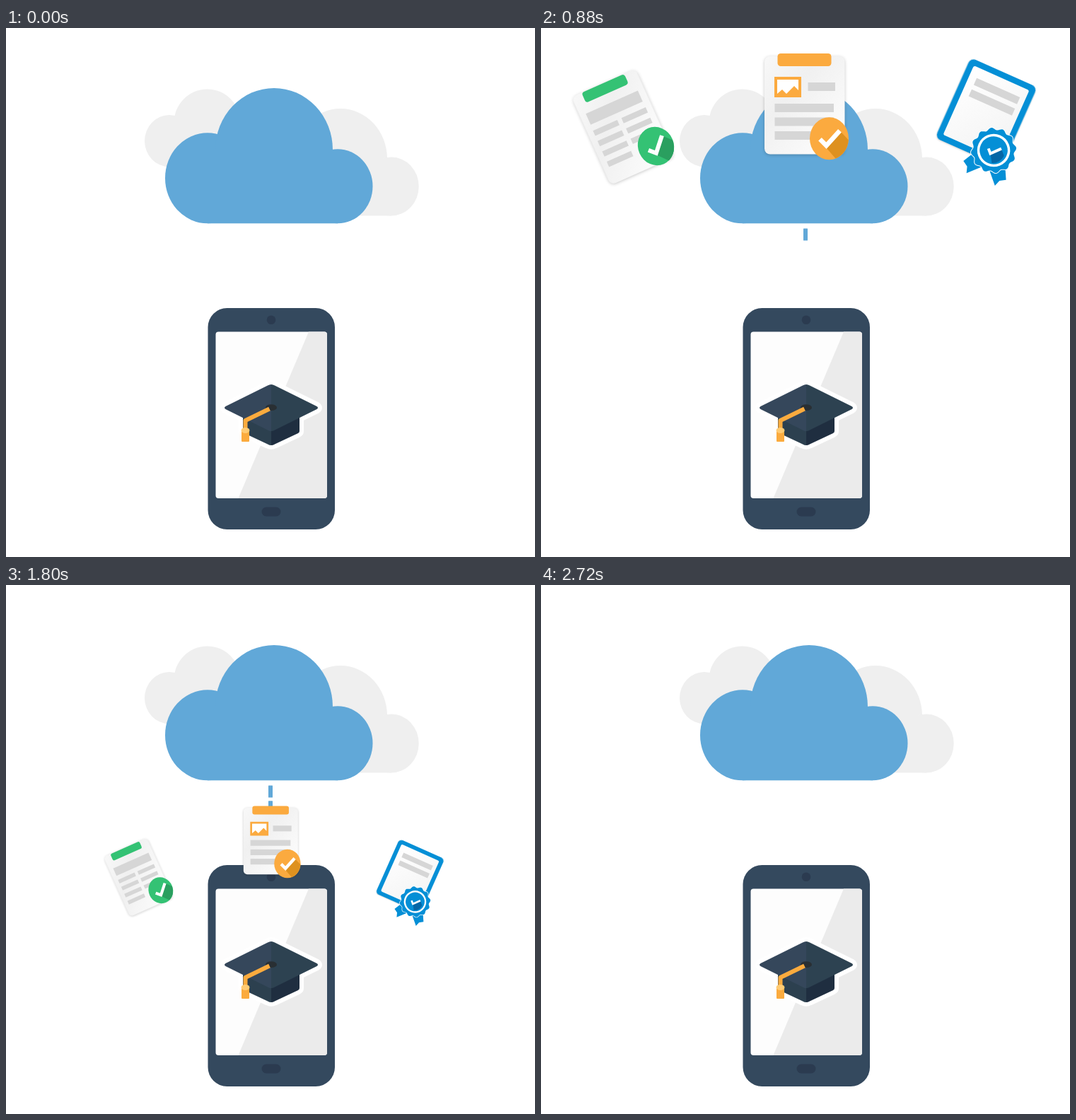
Write an HTML page that moves like this. It is 748 px wide and 748 px high and loops after 3600 ms.

```html
<!DOCTYPE html>
<html lang="en">
<head>
<meta charset="utf-8">
<title>Documents from cloud to phone</title>
<style>
  html, body { margin: 0; width: 100%; height: 100%; overflow: hidden; background: #fff; }
  svg { display: block; width: 100%; height: 100%; }
  .paper { fill: url(#sheet); filter: drop-shadow(0 1px 2px rgba(0, 0, 0, .22)); }
  .bar { fill: #d6d6d6; }
  .tick { fill: none; stroke: #fff; stroke-width: 6.5; }
</style>
</head>
<body>
<svg viewBox="0 0 748 748">
  <defs>
    <linearGradient id="sheet" x1="0" y1="0" x2="1" y2="1">
      <stop offset="0" stop-color="#f8f8f8"/>
      <stop offset=".35" stop-color="#f0f0f0"/>
      <stop offset="1" stop-color="#fff"/>
    </linearGradient>
    <linearGradient id="awardSheet" x1="0" y1="0" x2="1" y2="1">
      <stop offset="0" stop-color="#fff"/>
      <stop offset="1" stop-color="#f3f3f3"/>
    </linearGradient>
    <path id="tick" class="tick" d="M-13 1L-4 10L15 -11"/>
    <path id="ribbon" d="M4 26L22 45L25 36L33 31L24 14Z"/>
  </defs>

  <g id="phone">
    <rect x="285.5" y="396" width="179.5" height="313" rx="27" fill="#34495e"/>
    <circle cx="375" cy="412.7" r="6.3" fill="#2b3b50"/>
    <rect x="361.5" y="677.5" width="27" height="13" rx="6.5" fill="#2b3b50"/>
    <rect x="296.5" y="429.5" width="157.5" height="235.5" rx="4" fill="#fdfdfd"/>
    <path d="M428 429.5H450Q454 429.5 454 433.5V661Q454 665 450 665H328.5Z" fill="#ebebeb"/>
  </g>

  <g id="cap">
    <path fill="#fff" stroke="#fff" stroke-width="12" stroke-linejoin="round" d="M310.5 535L370 505.5Q375 502.5 380 505.5L439.5 535Q442.5 537 439.5 539L415 551V570Q415 572 413 573L380 588.5Q375 591 370 588.5L337 573Q335 572 335 570V551L310.5 539Q307.5 537 310.5 535Z"/>
    <path d="M335 545V570Q335 572 337 573L370 588.5Q372.5 590 375 590V545Z" fill="#2c404f"/>
    <path d="M415 545V570Q415 572 413 573L380 588.5Q377.5 590 375 590V545Z" fill="#1f2e40"/>
    <path d="M375 504Q372.5 504 370 505.5L310.5 535Q307.5 537 310.5 539L370 568.5Q372.5 570 375 570Z" fill="#35475b"/>
    <path d="M375 504Q377.5 504 380 505.5L439.5 535Q442.5 537 439.5 539L380 568.5Q377.5 570 375 570Z" fill="#2d4251"/>
    <ellipse cx="375" cy="536.7" rx="8" ry="4.4" fill="#292f33"/>
    <path d="M372.5 538.5L338.5 555V569" fill="none" stroke="#fbab3e" stroke-width="6" stroke-linejoin="round"/>
    <rect x="333" y="570" width="11" height="15" rx="1" fill="#fbab3e"/>
    <ellipse cx="338.5" cy="569" rx="6" ry="4" fill="#ffcb73"/>
  </g>

  <g id="sides">
    <g id="list">
      <g id="listBody" transform="rotate(-24)">
        <rect class="paper" x="-49.5" y="-68" width="99" height="136" rx="8"/>
        <rect x="-34" y="-68" width="66" height="15.5" rx="4" fill="#34c274"/>
        <rect class="bar" x="-40.5" y="-38.5" width="80.5" height="17"/>
      </g>
    </g>
    <g id="award">
      <g transform="translate(-.5 -13.5) rotate(24)">
        <rect x="-51.5" y="-62" width="103" height="124" rx="8" fill="#048fd6" style="filter:drop-shadow(0 1px 1px rgba(0,0,0,.18))"/>
        <rect x="-43" y="-53.5" width="86" height="107" rx="3" fill="url(#awardSheet)"/>
        <rect class="bar" x="-32" y="-39" width="67" height="10.5"/>
        <rect class="bar" x="-32" y="-21.5" width="67" height="10.5"/>
        <g transform="translate(31.4 44.6)">
          <g fill="#048fd6">
            <use href="#ribbon"/>
            <use href="#ribbon" transform="scale(-1 1)"/>
            <path id="rosette" stroke="#fff" stroke-width="2" paint-order="stroke"/>
          </g>
          <circle r="21.5" fill="none" stroke="#fff" stroke-width="3.5"/>
          <path d="M9 -6.6L16.5 1A18 18 0 0 1 5 17.5L-2.4 6Z" fill="#0667a6"/>
          <use href="#tick" transform="scale(.6)"/>
        </g>
      </g>
    </g>
  </g>

  <g fill="#efefef">
    <ellipse cx="231" cy="159.7" rx="35" ry="36.7"/>
    <ellipse cx="284.5" cy="134" rx="47" ry="47.5"/>
    <rect x="231" y="134" width="80" height="62.4"/>
    <ellipse cx="473" cy="185" rx="66" ry="71"/>
    <ellipse cx="545" cy="224" rx="38.7" ry="41.5"/>
    <rect x="473" y="185" width="72" height="80.5"/>
  </g>
  <g fill="#61a8d8">
    <ellipse cx="285" cy="212.3" rx="60" ry="64"/>
    <ellipse cx="379" cy="172" rx="83" ry="87"/>
    <ellipse cx="469" cy="223.8" rx="49.5" ry="52.5"/>
    <rect x="285" y="172" width="184" height="104.3"/>
  </g>
  <g id="link" fill="#61a8d8"></g>

  <g id="report">
    <g id="reportBody">
      <rect class="paper" x="-57" y="-68" width="113.5" height="138.5" rx="8"/>
      <rect x="-38.5" y="-72" width="76" height="18" rx="4.5" fill="#fbaa3f"/>
      <rect x="-43" y="-39" width="38" height="29" fill="#fbaa3f"/>
      <path d="M-39 -35H-9V-20L-15 -26L-26 -15L-32 -21L-39 -15Z" fill="#fff"/>
      <rect class="bar" x="4.5" y="-31" width="38.5" height="12"/>
      <rect class="bar" x="-42.5" y="-1" width="83.5" height="12"/>
      <rect class="bar" x="-42.5" y="18.5" width="83.5" height="12"/>
      <rect class="bar" x="-42.5" y="38" width="70" height="12"/>
    </g>
  </g>
</svg>
<script>
const LOOP = 3600, TICK = 40;
const byId = id => document.getElementById(id);

function add(parent, tag, attrs) {
  const node = document.createElementNS('http://www.w3.org/2000/svg', tag);
  for (const key in attrs) node.setAttribute(key, attrs[key]);
  return parent.appendChild(node);
}

function addBadge(parent, transform, color, shade) {
  const badge = add(parent, 'g', { transform });
  add(badge, 'ellipse', { rx: 27.5, ry: 30, fill: color });
  add(badge, 'path', { d: 'M16 -10L27.2 2A27.5 30 0 0 1 9 28.3L-6 11Z', fill: shade });
  add(badge, 'use', { href: '#tick' });
}

for (let row = 0; row < 4; row++) {
  const y = -12.5 + row * 16;
  add(byId('listBody'), 'rect', { class: 'bar', x: -41, y, width: 37.5, height: 8 });
  if (row < 3) add(byId('listBody'), 'rect', { class: 'bar', x: 3, y, width: 37.5, height: 8 });
}
addBadge(byId('listBody'), 'translate(31.5 43.6) scale(.92)', '#34c274', '#2a9f5f');
addBadge(byId('reportBody'), 'translate(34.5 48.2)', '#fbaa3f', '#de911f');

const scallops = Array.from({ length: 144 }, (_, i) => {
  const angle = i / 144 * 2 * Math.PI, r = 30.5 + 1.7 * Math.cos(12 * angle);
  return (r * Math.cos(angle)).toFixed(2) + ' ' + (r * Math.sin(angle)).toFixed(2);
});
byId('rosette').setAttribute('d', 'M' + scallops.join('L') + 'Z');

const dashes = Array.from({ length: 5 }, (_, i) =>
  add(byId('link'), 'rect', { x: 371, y: 283.5 + i * 21.8, width: 6, height: 17, rx: .5 }));

// Each route: bend point and far end, both relative to the resting place.
const docs = [
  { node: byId('list'), home: [116, 140], from: [[107, -34], [250, 115]], to: [[-17, 283], [244, 413]] },
  { node: byId('award'), home: [630, 133], from: [[-100, -10], [-245, 122]], to: [[54, 309], [-260, 418]] },
  { node: byId('report'), home: [373, 108], from: [[-6, 72], [0, 150]], to: [[1.3, 232], [2.6, 428]] }
];

const ease = p => (1 - Math.cos(Math.PI * Math.min(1, Math.max(0, p)))) / 2;

function place(doc, [bend, end], u, power) {
  const [x, y] = doc.home.map((v, i) => v + 2 * u * (1 - u) * bend[i] + u * u * end[i]);
  doc.node.setAttribute('transform', `translate(${x} ${y}) scale(${1 - .88 * u ** power})`);
}

// Side documents rise behind the clouds, then come to the front.
function stackSides(inFront) {
  const below = byId(inFront ? 'link' : 'cap'), sides = byId('sides');
  if (below.nextElementSibling !== sides) below.after(sides);
}

function draw(t) {
  const leaving = t > 1560;
  const u = leaving ? ease((t - 1560) / 440) : 1 - ease(t / 280);
  stackSides(t >= 1400);
  for (const doc of docs) {
    doc.node.style.display = u < 1 ? '' : 'none';
    place(doc, leaving ? doc.to : doc.from, u, leaving ? 1.8 : 2);
  }
  dashes.forEach((dash, i) => {
    const shown = t >= 880 + i * TICK && t < 2560 + i * TICK;
    dash.style.display = shown ? '' : 'none';
  });
  const pulse = 1 + .07 * Math.max(0, 1 - Math.abs(t - 2120) / 200);
  byId('cap').setAttribute('transform', `translate(375 547) scale(${pulse}) translate(-375 -547)`);
}

const start = performance.now();
function frame() {
  const t = (performance.now() - start) % LOOP;
  draw(Math.floor(t / TICK) * TICK);
  requestAnimationFrame(frame);
}
frame();
</script>
</body>
</html>
```
